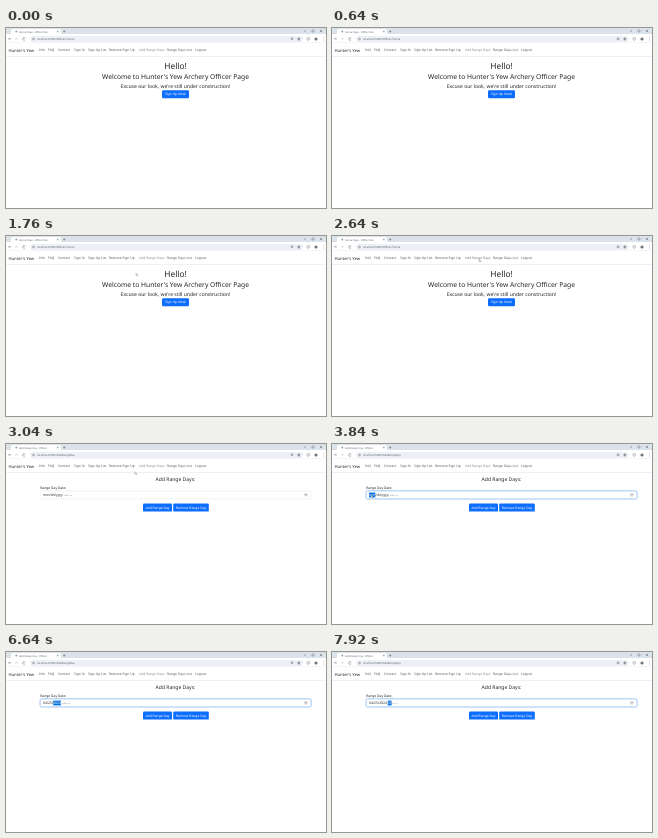
Recreate the animation shown at these times as an HTML page with a canvas. Size 320x180 px, loop 8000 ms.

```html
<!DOCTYPE html>
<html lang="en">
<head>
<meta charset="utf-8">
<title>Officer page</title>
<style>
html, body { margin: 0; width: 100%; height: 100%; overflow: hidden; background: #fff; }
canvas { display: block; width: 320px; height: 180px; }
</style>
</head>
<body>
<canvas id="stage"></canvas>
<script>
const LOOP = 8000, REM = 3.36, MID = 169.5;
const BLUE = '#0d6efd', INK = '#212529';
const CLUB = "Hunter's Yew";
const canvas = document.getElementById('stage');
const scale = window.devicePixelRatio || 1;
canvas.width = 320 * scale;
canvas.height = 180 * scale;
const c = canvas.getContext('2d');
c.scale(scale, scale);
if ('textRendering' in c) c.textRendering = 'geometricPrecision';

function text(str, x, y, size = REM, color = INK, align = 'left', weight = 400) {
  c.font = `${weight} ${size}px "Noto Sans", "Open Sans", sans-serif`;
  c.textAlign = align;
  c.textBaseline = 'alphabetic';
  c.fillStyle = color;
  c.fillText(str, x, y);
  return c.measureText(str).width;
}

function rect(x, y, w, h, color) {
  c.fillStyle = color;
  c.fillRect(x, y, w, h);
}

function box(x, y, w, h, r, fill, stroke, line = 0.4) {
  c.beginPath();
  c.roundRect(x, y, w, h, r);
  if (fill) { c.fillStyle = fill; c.fill(); }
  if (stroke) { c.strokeStyle = stroke; c.lineWidth = line; c.stroke(); }
}

function path(points, color = '#5f6368', line = 0.5) {
  c.beginPath();
  points.forEach(([x, y], i) => i ? c.lineTo(x, y) : c.moveTo(x, y));
  c.strokeStyle = color;
  c.lineWidth = line;
  c.stroke();
}

function ring(x, y, r, color = '#5f6368', from = 0, to = Math.PI * 2) {
  c.beginPath();
  c.arc(x, y, r, from, to);
  c.strokeStyle = color;
  c.lineWidth = 0.5;
  c.stroke();
}

function dot(x, y, r, color) {
  c.beginPath();
  c.arc(x, y, r, 0, Math.PI * 2);
  c.fillStyle = color;
  c.fill();
}

function browser(formPage) {
  rect(0, 0, 320, 6, '#dce2ea');
  box(5, 1, 50, 6, [2, 2, 0, 0], '#fff');
  dot(10.3, 3.5, 1, '#9aa0a6');
  text(formPage ? 'Add Range Day - Officer' : 'Home Page - Officer Site', 13, 4.5, 2.5, '#5f6368');
  path([[51, 2.7], [52.6, 4.3]]);
  path([[52.6, 2.7], [51, 4.3]]);
  path([[57, 3.5], [59.4, 3.5]]);
  path([[58.2, 2.3], [58.2, 4.7]]);
  path([[298, 3], [300, 3]]);
  box(306, 2, 2, 2, 0, null, '#5f6368');
  path([[314, 2], [316, 4]]);
  path([[316, 2], [314, 4]]);

  rect(0, 6, 320, 9, '#fff');
  path([[5, 11], [2.5, 11], [3.7, 9.8]]);
  path([[9, 11], [11.5, 11], [10.3, 9.8]], '#b5b8bc');
  ring(18, 11, 1.3, '#5f6368', 0.6, 6);
  box(24, 8, 273, 6, 3, '#edf1f7');
  ring(27.5, 11, 0.9);
  text('localhost:5000/' + (formPage ? 'AddRangeDay' : 'Officer/Home'), 31, 12, 2.75, '#5f6368');
  ring(286, 10.7, 1);
  path([[286.8, 11.5], [287.6, 12.3]]);
  path([[291.4, 10.6], [294.2, 10.6], [291.9, 12.3], [292.8, 9.5], [293.7, 12.3], [291.4, 10.6]], '#5f6368', 0.4);
  box(301, 9.7, 2.4, 2.4, 0.4, null, '#5f6368');
  dot(310, 11, 1.6, '#70767c');
  [9.7, 11, 12.3].forEach(y => dot(317.5, y, 0.35, '#5f6368'));
}

const LINKS = [['Info', 33], ['FAQ', 42], ['Contact', 52], ['Sign In', 68], ['Sign Up List', 82],
  ['Remove Sign Up', 103], ['Add Range Days', 133], ['Range Days List', 161], ['Logout', 189]];

function nav(hover) {
  rect(0, 14.6, 320, 0.4, '#e3e6ea');
  text(CLUB, 2.4, 23.7, REM * 1.25);
  LINKS.forEach(([label, x]) => {
    const color = x === 133 ? (hover ? '#777' : '#8a8c8e') : '#55585b';
    text(label, x, 23.4, REM, color);
  });
  rect(0, 28.4, 320, 0.5, '#dfe2e5');
}

function button(label, x, y, w, h) {
  box(x, y, w, h, 1.2, BLUE);
  text(label, x + w / 2, y + h / 2 + 1.2, REM, '#fff', 'center');
}

function home() {
  text('Hello!', MID, 40.6, REM * 2.5, INK, 'center', 500);
  text(`Welcome to ${CLUB} Archery Officer Page`, MID, 50.6, REM * 2, INK, 'center', 500);
  text("Excuse our look, we're still under construction!", MID, 59.5, REM * 1.5, INK, 'center', 500);
  button('Sign Up Now!', 156, 62.2, 27, 8);
}

// Each entry: start time, date parts, index of the selected part.
const ENTRY = [
  [0, 'mm dd yyyy -- -- --', -1],
  [3760, 'mm dd yyyy -- -- --', 0],
  [4720, '04 dd yyyy -- -- --', 0],
  [4960, '04 dd yyyy -- -- --', 1],
  [5680, '04 02 yyyy -- -- --', 1],
  [5760, '04 25 yyyy -- -- --', 1],
  [5840, '04 25 yyyy -- -- --', 2],
  [6160, '04 25 0002 -- -- --', 2],
  [6320, '04 25 0020 -- -- --', 2],
  [6480, '04 25 0202 -- -- --', 2],
  [6640, '04 25 2024 -- -- --', 2],
  [7120, '04 25 2024 -- -- --', 3],
  [7680, '04 25 2024 05 -- --', 3]
];
const GAPS = ['/', '/', ' ', ':', ' ', ''];

function dateField(t) {
  const [, value, picked] = ENTRY.filter(e => e[0] <= t).pop();
  const focused = picked >= 0;
  if (focused) box(33.9, 46.6, 271.4, 8.6, 1.6, null, '#c5dcfc', 0.9);
  box(34.3, 47, 270.6, 7.8, 1.2, '#fff', focused ? '#75aef0' : '#dee2e6', 0.45);
  let x = 37;
  value.split(' ').forEach((part, i) => {
    c.font = `400 ${REM}px "Noto Sans", "Open Sans", sans-serif`;
    const w = c.measureText(part).width;
    if (i === picked) rect(x, 48.6, w, 4.8, '#0872dc');
    text(part, x, 52.1, REM, i === picked ? '#fff' : INK);
    x += w;
    x += text(GAPS[i], x, 52.1);
  });
  box(298.8, 49.8, 2.2, 2.2, 0.3, null, '#777', 0.35);
  path([[298.8, 50.5], [301, 50.5]], '#777', 0.4);
}

function form(t) {
  text('Add Range Days:', MID, 37, REM * 1.5, INK, 'center', 500);
  text('Range Day Date:', 34.2, 45.4);
  dateField(t);
  button('Add Range Day', 137, 59.4, 29, 8.2);
  button('Remove Range Day', 167.2, 59.4, 35.6, 8.2);
}

const TRAIL = [[880, 162, 174], [960, 150, 125], [1040, 140.5, 93], [1280, 133, 58], [1680, 130, 38],
  [1760, 130, 37], [2000, 133, 34], [2240, 135, 33], [2640, 147, 23], [2960, 147, 23],
  [3440, 39, 51], [3920, 39, 51], [4160, 35.3, 54.5]];

function pointer(t) {
  if (t < 880 || t >= 6160) return;
  let [, x, y] = TRAIL[TRAIL.length - 1];
  for (let i = 1; i < TRAIL.length; i++) {
    const [t0, x0, y0] = TRAIL[i - 1], [t1, x1, y1] = TRAIL[i];
    if (t >= t0 && t < t1) {
      const k = (t - t0) / (t1 - t0);
      x = x0 + (x1 - x0) * k;
      y = y0 + (y1 - y0) * k;
      break;
    }
  }
  c.beginPath();
  [[0, 0], [0, 2.7], [0.65, 2.1], [1.1, 3.1], [1.5, 2.9], [1.1, 1.9], [1.9, 1.9]]
    .forEach(([dx, dy]) => c.lineTo(x + dx, y + dy));
  c.closePath();
  c.fillStyle = '#fff';
  c.fill();
  c.strokeStyle = '#777';
  c.lineWidth = 0.35;
  c.stroke();
}

function draw(now) {
  const t = Math.floor((now % LOOP) / 80) * 80;
  const formPage = t >= 2880;
  rect(0, 0, 320, 180, '#fff');
  browser(formPage);
  nav(t >= 2560 && t < 2960);
  if (formPage) form(t); else home();
  pointer(t);
  requestAnimationFrame(draw);
}
draw(0);
</script>
</body>
</html>
```
